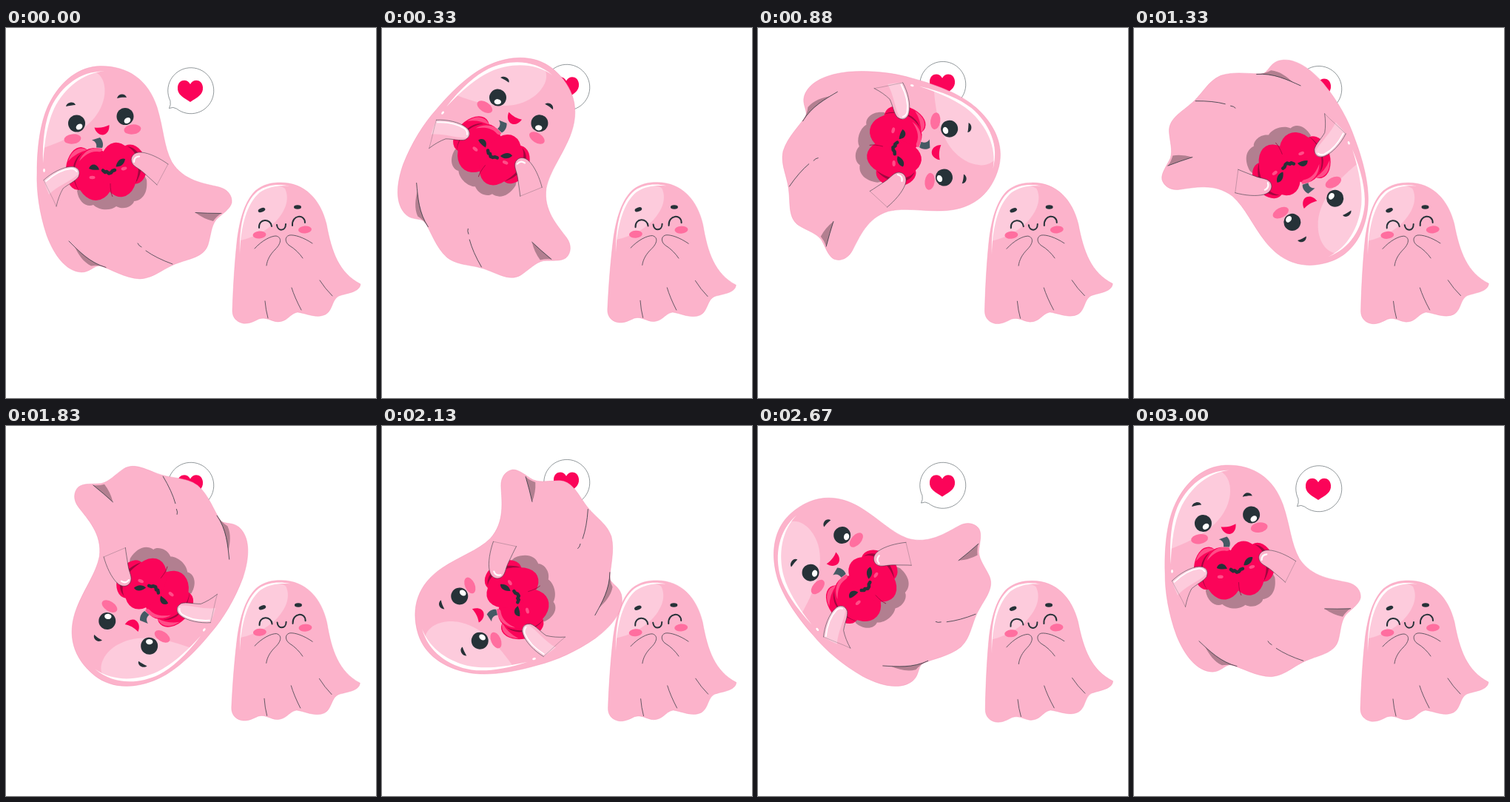
Write an HTML page that moves like this. It is 500x500 px and loops after 3040 ms.

```html
<!DOCTYPE html>
<html lang="en">
<head>
<meta charset="utf-8">
<title>Ghost friends</title>
<style>
  html, body { margin: 0; width: 100%; height: 100%; overflow: hidden; background: #fff; }
  svg { display: block; width: 100%; height: 100%; }
  .body { fill: #fcb3cb; }
  .edge { stroke: #f48fb2; stroke-width: .4; }
  .light { fill: #fdcbdc; }
  .shade { fill: #b27f90; }
  .ink { fill: #263238; }
  .red { fill: #fb0459; }
  .deep { fill: #a3063f; }
  .glow { fill: #ff4d88; }
  .cheek { fill: #ff6e9f; }
  .white { fill: #fff; }
  .line { fill: none; stroke: #263238; stroke-width: .7; stroke-linecap: round; }
  .thin { stroke: #263238; stroke-width: .5; }
  .faint { stroke-width: .5; stroke-opacity: .45; }
  .smile { fill: none; stroke: #263238; stroke-width: 2; stroke-linecap: round; }
</style>
</head>
<body>
<svg viewBox="0 0 500 500">
  <g id="bubble">
    <path class="white thin" d="M230.5 109A31 31 0 1 0 222 98.5Q223 104 220.5 108.5Q226 106 230.5 109Z"/>
    <path class="red" d="M249 100C240 94 231 90 232 80C233 69 245 68 249 76C253 68 265 69 266 80C267 90 258 94 249 100Z"/>
  </g>

  <g id="small">
    <path class="body edge" d="M371 209C404 209 425 232 433 265C440 303 450 331 479 346C478 357 462 358 450 362C440 367 442 381 432 387C420 393 407 386 394 384C383 386 381 397 367 397C357 396 352 390 342 393C334 397 328 400 320 399C311 397 306 391 306 382C307 350 309 318 312 290C316 255 324 233 337 220C348 211 359 209 371 209Z"/>
    <path class="light" d="M317 287C319 255 329 231 342 221C354 213 370 211 377 217C384 232 377 248 364 262C352 274 335 283 317 287Z"/>
    <path class="white" d="M316 306C315 263 323 235 340 220.5C353 211.5 368 210.5 383 213.5C368 212.5 355 214 342.500 222.500C326 237 317 266 316 306Z"/>
    <ellipse class="ink" cx="345.5" cy="246" rx="5" ry="2.7" transform="rotate(-20 345.5 246)"/>
    <ellipse class="ink" cx="394" cy="242" rx="5" ry="2.7"/>
    <ellipse class="cheek" cx="342.5" cy="279.5" rx="9" ry="5" transform="rotate(-5 342.5 279.5)"/>
    <ellipse class="cheek" cx="404" cy="272.5" rx="9" ry="5" transform="rotate(-5 404 272.5)"/>
    <path class="smile" d="M342 270C341 257 358 257 359 268M387 267C386 252 404 251 404 263M366 266C367 275 378 275 378 265"/>
    <path class="line" d="M336 298C346 287 358 281 365 281C373 283 372 291 364 299C357 306 353 313 352 321M414 291C402 283 390 279 383 280C376 282 377 290 383 294C390 298 397 305 401 311"/>
    <path class="line" d="M350 369Q351 381 354 392M386 351Q390 364 399 381M424 341Q431 352 441 362"/>
  </g>

  <g id="big">
    <path class="body edge" d="M128 51.5C165 51.5 192 70 204 107C213 136 213 160 224 181C240 207 268 210 288 215C300 218 306 227 305 236C303 245 292 251 284 259C277 268 277 280 273 293C268 308 252 311 237 316C213 323 202 338 181 339C160 338 143 326 126 321C118 322 113 330 102 330C81 329 65 307 55 280C45 250 41 220 42 195C42 155 48 122 59 101C74 72 98 52 128 51.5Z"/>
    <path class="light" d="M51 162C52 135 57 115 64 103C79 76 104 59 122 60C135 68 136 88 130 103C120 130 92 148 51 162Z"/>
    <path class="white" d="M50 183C49 150 53 125 61 107C75 78 101 58 133 58.5C104 60.5 79 81 65 109C57 126 52 150 50 183Z"/>
    <ellipse class="white" cx="51.5" cy="192.5" rx="1.4" ry="2.4"/>

    <path class="shade" d="M93 296C107 309 118 318 135 323.5Q124 320 115 321.5C104 316 98 306 93 296ZM256 249.5Q272 250.5 291 250.5Q285 254 280 261Q267 258 256 249.5Z"/>
    <path class="line" d="M85 288C99 302 113 317 135 323.5M178 291Q179 294 183 296M189 301Q203 311 225 319M256 249.5Q272 250.5 291 250.5"/>

    <path class="ink" d="M81 106C82 100 92 98 94 104C90 104 86 105 81 106ZM150 95C152 88 161 88 163 94C158 93.5 155 94 150 95Z"/>
    <circle class="ink" cx="95.5" cy="129" r="11.5"/>
    <circle class="ink" cx="161" cy="119.5" r="11.5"/>
    <ellipse class="white" cx="99" cy="133.5" rx="4.7" ry="3.6" transform="rotate(-35 99 133.5)"/>
    <ellipse class="white" cx="164" cy="125" rx="4.7" ry="3.6" transform="rotate(-35 164 125)"/>
    <ellipse class="cheek" cx="90" cy="150" rx="11.5" ry="6.6" transform="rotate(-7 90 150)"/>
    <ellipse class="cheek" cx="171" cy="137" rx="11.5" ry="6.6" transform="rotate(-7 171 137)"/>
    <path class="red" d="M119.5 134.5C127 135.5 134 134 139.5 131C140 139 136 144 131 144.5C125 144.5 121 140 119.5 134.5Z"/>

    <path class="shade" d="M96 220C98 236 110 243 118 239C126 247 142 247 149 241C160 247 172 240 173 234C185 233 192 222 190 205L180 185L110 205Z"/>
    <g id="pumpkin">
      <ellipse class="red" cx="99.5" cy="190" rx="18.5" ry="29" transform="rotate(6 99.5 190)"/>
      <path class="glow" d="M84 180Q89 164 101 162.5Q108 163 110 165Q95 168 84 180Z"/>
      <ellipse class="red" cx="171" cy="184" rx="18.5" ry="27" transform="rotate(-14 171 184)"/>
      <path class="deep" d="M164 160C180 168 183 192 174 211C181 203 186 186 181 174C178 166 172 161 164 160ZM103 169C91 181 88 202 99 220C92 212 88 196 92 183C95 175 99 171 103 169Z"/>
      <ellipse class="red" cx="120" cy="197.5" rx="26" ry="35.5" transform="rotate(-5 120 197.5)"/>
      <ellipse class="red" cx="152" cy="191.5" rx="24.5" ry="37" transform="rotate(-9 152 191.5)"/>
      <path class="glow" d="M99 180C104 166 118 159 130 163C131 166 128 168 124 167C114 166 106 172 99 180Z"/>
      <path d="M141 210Q141 222 144 228" fill="none" stroke="#a3063f" stroke-width=".8"/>
      <path d="M116 151.5L127 148C131 152 132 158 130 162L122 161.5C123 157 121 153 116 151.5Z" fill="#455a64"/>
      <path class="ink" d="M112 190C114 183 123 182 126 191.5C121 192 116 192 112 190ZM148.5 187.5C150 179 156 175 161 177C160 184 155 188 148.5 187.5Z"/>
      <path d="M131 192.5L134 195L136 194L139 196.5L142 195.5L144 193L147 192" fill="none" stroke="#263238" stroke-width="4.5" stroke-linejoin="round" stroke-linecap="round"/>
      <ellipse class="glow" cx="116.5" cy="202" rx="4" ry="2.2"/>
      <ellipse class="glow" cx="159.5" cy="190" rx="4" ry="2.2" transform="rotate(-15 159.5 190)"/>
    </g>

    <path class="body" d="M51 205.5C61 196 77 187.500 88 187.500C97 187 101 194 98 201C94 207 84 211 77 217C73 224 70 232 68 241C63 229 56 217 51 205.5Z"/>
    <path class="light" d="M51 205.5C61 196 77 187.5 88 187.5C96 187 100 192 99 197C86 208 70 213 58 225Q54 216 51 205.5Z"/>
    <path d="M54 207C64 198 76 191 88 190Q93 190 95.5 194" fill="none" stroke="#fff" stroke-width="1.8" stroke-linecap="round"/>
    <path class="line thin" d="M51 205.5C61 196 77 187.5 88 187.5C97 187 101 194 98 201C94 207 84 211 77 217C73 224 70 232 68 241"/>
    <path class="line faint" d="M68 241C63 229 56 217 51 205.5"/>

    <path class="body" d="M219 184C208 176 194 169 183 168C174 167 168 173 169.5 180C171 187 179 189 186 195.5C193 202 199 207 204 212Z"/>
    <path d="M173 181Q173 174 180 173.5" fill="none" stroke="#fff" stroke-width="2.2" stroke-linecap="round"/>
    <path class="line thin" d="M219 184C208 176 194 169 183 168C174 167 168 173 169.5 180C171 187 179 189 186 195.5C193 202 199 207 204 212"/>
    <path class="line faint" d="M204 212L219 184"/>
  </g>
</svg>
<script>
  const LOOP = 3040, STEP = 1000 / 24, LAST = 72, SWAY = 36;
  const [bubble, small, big] = ["bubble", "small", "big"].map(id => document.getElementById(id));
  const move = (el, value) => el.setAttribute("transform", value);

  // Straight-sided wave: 0 at the start, 1 halfway, 0 at the end
  const triangle = p => 1 - Math.abs(1 - 2 * (p - Math.floor(p)));

  function draw(now) {
    const step = Math.min(LAST, Math.floor((now % LOOP + 3.4) / STEP));
    const phase = step / SWAY;
    move(big, `rotate(${step * 4.975} 174.3 195.8)`);
    move(bubble, `translate(0 ${-10 * triangle(phase)})`);
    move(small, `rotate(${2 * triangle(phase + .25) - 1} 392.3 304)`);
  }

  let start;
  function tick(now) {
    start ??= now;
    draw(now - start);
    requestAnimationFrame(tick);
  }
  draw(0);
  requestAnimationFrame(tick);
</script>
</body>
</html>
```
